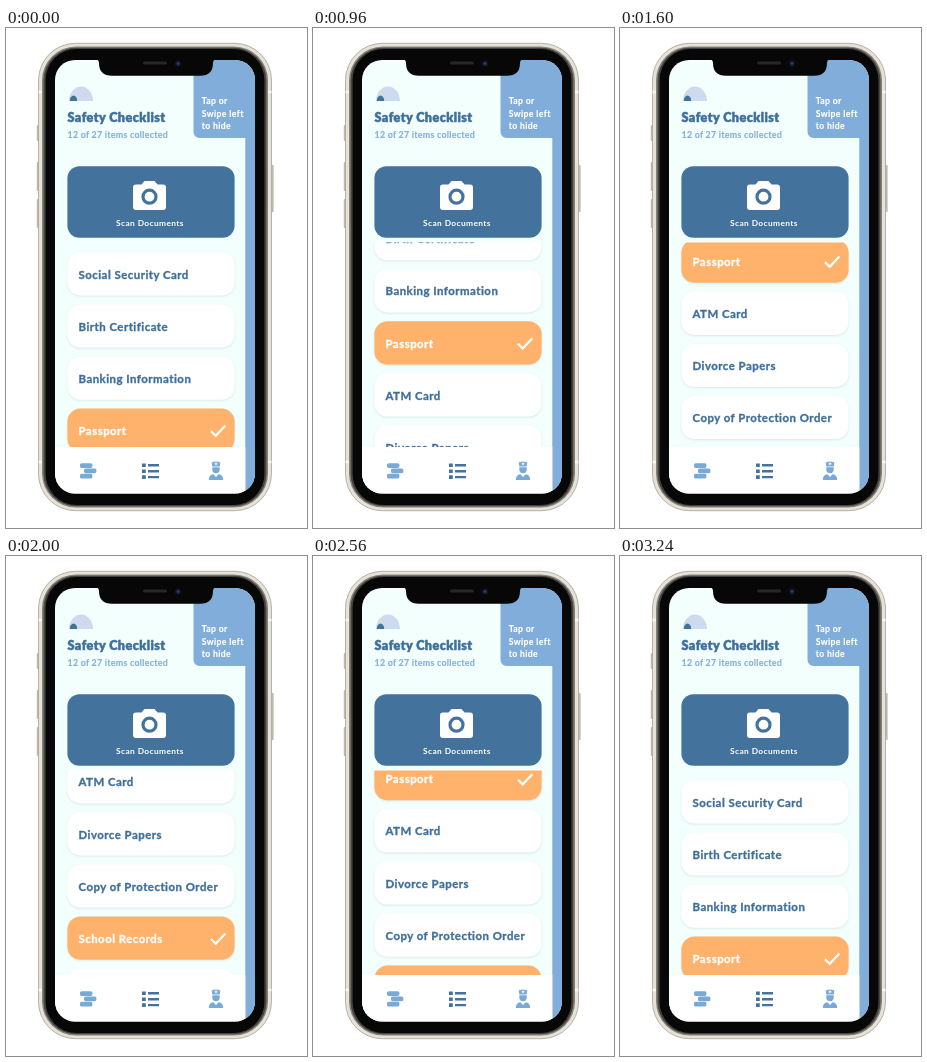
An HTML page for the animation above (3520 ms loop, 301x500 px).

```html
<!DOCTYPE html>
<html lang="en">
<head>
<meta charset="utf-8">
<title>Safety Checklist</title>
<style>
  html, body { margin: 0; width: 100%; height: 100%; overflow: hidden; background: #fff; }
  svg { display: block; width: 301px; height: 500px; }
  text { font-family: Lato, "Open Sans", sans-serif; font-weight: 700; letter-spacing: .045em; }
  .label { font-size: 11.4px; letter-spacing: .043em; stroke-width: .35px; }
  .title { font-size: 12.6px; font-weight: 900; letter-spacing: .034em; stroke-width: .5px; }
  .card { filter: drop-shadow(0 1px 1px rgba(60, 100, 120, .14)); }
</style>
</head>
<body>
<svg viewBox="0 0 301 500">
  <defs>
    <clipPath id="screen"><rect x="49" y="32" width="200" height="433.5" rx="20"/></clipPath>
    <clipPath id="window"><rect x="49" y="214.5" width="190" height="204.5"/></clipPath>
  </defs>

  <!-- phone body -->
  <g fill="#bbb7ac">
    <rect x="30.8" y="97" width="2.2" height="16" rx="1"/>
    <rect x="30.8" y="134" width="2.2" height="29" rx="1"/>
    <rect x="30.8" y="171" width="2.2" height="29" rx="1"/>
    <rect x="265.4" y="137" width="2.2" height="47" rx="1"/>
  </g>
  <rect x="32.5" y="15.300" width="233" height="467.400" rx="37" fill="#e6e2d8" stroke="#aeaa9f" stroke-width=".9"/>
  <path d="M32.500 64h4M32.500 434h4M261.500 64h4M261.500 434h4" stroke="#f7f5f0" stroke-width="2.500"/>
  <rect x="36" y="18.500" width="226" height="461" rx="34" fill="#85817a"/>
  <rect x="37.600" y="19.800" width="222.800" height="458.400" rx="32.500" fill="#45433f"/>
  <rect x="39.600" y="21" width="218.800" height="456" rx="31" fill="#070707"/>

  <g clip-path="url(#screen)">
    <rect x="49" y="32" width="200" height="434" fill="#f3fffc"/>
    <g clip-path="url(#window)"><g id="list"></g></g>

    <!-- header -->
    <path d="M63 73a12 14.500 0 0 1 24 0z" fill="#d0daee"/>
    <path d="M63.800 73a3.700 5.500 0 0 1 7.400 0z" fill="#43739d"/>
    <text class="title" x="61.500" y="94" fill="#3f6f9b" stroke="#3f6f9b">Safety Checklist</text>
    <text x="61.500" y="110" font-size="8.8" fill="#88b2da" stroke="#88b2da" stroke-width=".2" style="letter-spacing:.032em">12 of 27 items collected</text>

    <!-- scan button -->
    <rect x="61.400" y="138.200" width="167.200" height="71.600" rx="12" fill="#43739d"/>
    <path d="M130 156.500h5.500l3-3.500h10l3 3.500h5.500a3 3 0 0 1 3 3v19.500a3 3 0 0 1-3 3h-27a3 3 0 0 1-3-3v-19.500a3 3 0 0 1 3-3z" fill="#fff"/>
    <circle cx="143.500" cy="168.700" r="6.500" fill="#fff" stroke="#43739d" stroke-width="3.200"/>
    <text x="144" y="198" font-size="8.4" fill="#fff" text-anchor="middle">Scan Documents</text>

    <!-- side panel -->
    <path d="M187.500 30h62v436h-10.200V110h-45.800a6 6 0 0 1-6-6z" fill="#80add9"/>
    <g font-size="8.6" fill="#fff" stroke="#fff" stroke-width=".2">
      <text x="195.700" y="76.300">Tap or</text>
      <text x="195.700" y="88.600">Swipe left</text>
      <text x="195.700" y="101">to hide</text>
    </g>

    <!-- tab bar -->
    <rect x="49" y="419" width="190.300" height="47" fill="#fff"/>
    <g fill="#78aad8">
      <rect x="74" y="435.200" width="12.400" height="4.700" rx="1.600"/>
      <rect x="78" y="440.500" width="12.400" height="4.700" rx="1.600"/>
      <rect x="74" y="445.800" width="12.400" height="4.700" rx="1.600"/>
      <path d="M205.700 434.500q4.300-2 8.600 0l-.6 4h-7.400z"/>
      <path d="M206.300 439.300h7.400v2a3.700 4 0 0 1-7.400 0z"/>
      <path d="M202.800 452q0-5.200 4.600-5.700l2.600 2.700 2.600-2.700q4.600.5 4.600 5.700z"/>
    </g>
    <path d="M210 434.300v3M208.500 435.800h3" stroke="#fff" stroke-width=".9"/>
    <g stroke="#43739d">
      <path d="M136 437.300h3.800M136 443.200h3.800M136 449.100h3.800" stroke-width="3.600"/>
      <path d="M142 437.300h11M142 443.200h11M142 449.100h11" stroke-width="2.400"/>
    </g>
  </g>

  <!-- notch -->
  <path d="M89 31q4 .5 4 4 0 12.700 13 12.700h88q13 0 13-12.700 0-3.500 4-4z" fill="#070707"/>
  <rect x="137" y="33.500" width="24" height="3" rx="1.500" fill="#25272a"/>
  <circle cx="172" cy="35.500" r="3" fill="#10192b"/>
  <circle cx="172" cy="35.500" r="1.200" fill="#2b4677"/>
</svg>

<script>
const LOOP = 3520, STEP = 40, PITCH = 52.1;

// The last card only shows its top edge, so it carries no label.
const items = [
  ["Social Security Card"], ["Birth Certificate"], ["Banking Information"],
  ["Passport", true], ["ATM Card"], ["Divorce Papers"],
  ["Copy of Protection Order"], ["School Records", true], ["Work Permit"], ["", true]
];

// Scroll keys: time, offset, speed (px per ms)
const keys = [
  [0, 0, 0], [640, 37, .12], [1200, 129, .16], [1600, 169, .075],
  [2000, 228.5, .2], [2340, 292, 0], [2860, 0, 0], [LOOP, 0, 0]
];

const list = document.getElementById("list");

function add(parent, tag, attrs) {
  const el = document.createElementNS("http://www.w3.org/2000/svg", tag);
  for (const name in attrs) el.setAttribute(name, attrs[name]);
  return parent.appendChild(el);
}

items.forEach(([label, done], i) => {
  const row = add(list, "g", { transform: `translate(0 ${246 + i * PITCH})` });
  const ink = done ? "#fff" : "#3f6f9b";
  add(row, "rect", {
    class: "card", x: 61.4, y: -21.7, width: 167.2, height: 43.2, rx: 13,
    fill: done ? "#ffb26b" : "#fff"
  });
  add(row, "text", { class: "label", x: 72.5, y: 4.5, fill: ink, stroke: ink })
    .textContent = label;
  if (done) add(row, "path", {
    d: "M205 .8l4.700 4.700 9.700-10.200", fill: "none", stroke: ink, "stroke-width": 2.2
  });
});

// Cubic Hermite curve between neighbouring keys
function scrollAt(t) {
  const n = keys.findIndex(k => k[0] > t);
  const [t0, y0, v0] = keys[n - 1], [t1, y1, v1] = keys[n];
  const d = t1 - t0, u = (t - t0) / d, w = 1 - u;
  return y0 + (y1 - y0) * u * u * (3 - 2 * u) + d * u * w * (v0 * w - v1 * u);
}

function draw(now) {
  const t = Math.floor((now % LOOP) / STEP) * STEP;
  list.setAttribute("transform", `translate(0 ${-scrollAt(t).toFixed(2)})`);
}

const start = performance.now();
function tick() {
  draw(performance.now() - start);
  requestAnimationFrame(tick);
}
tick();
</script>
</body>
</html>
```
